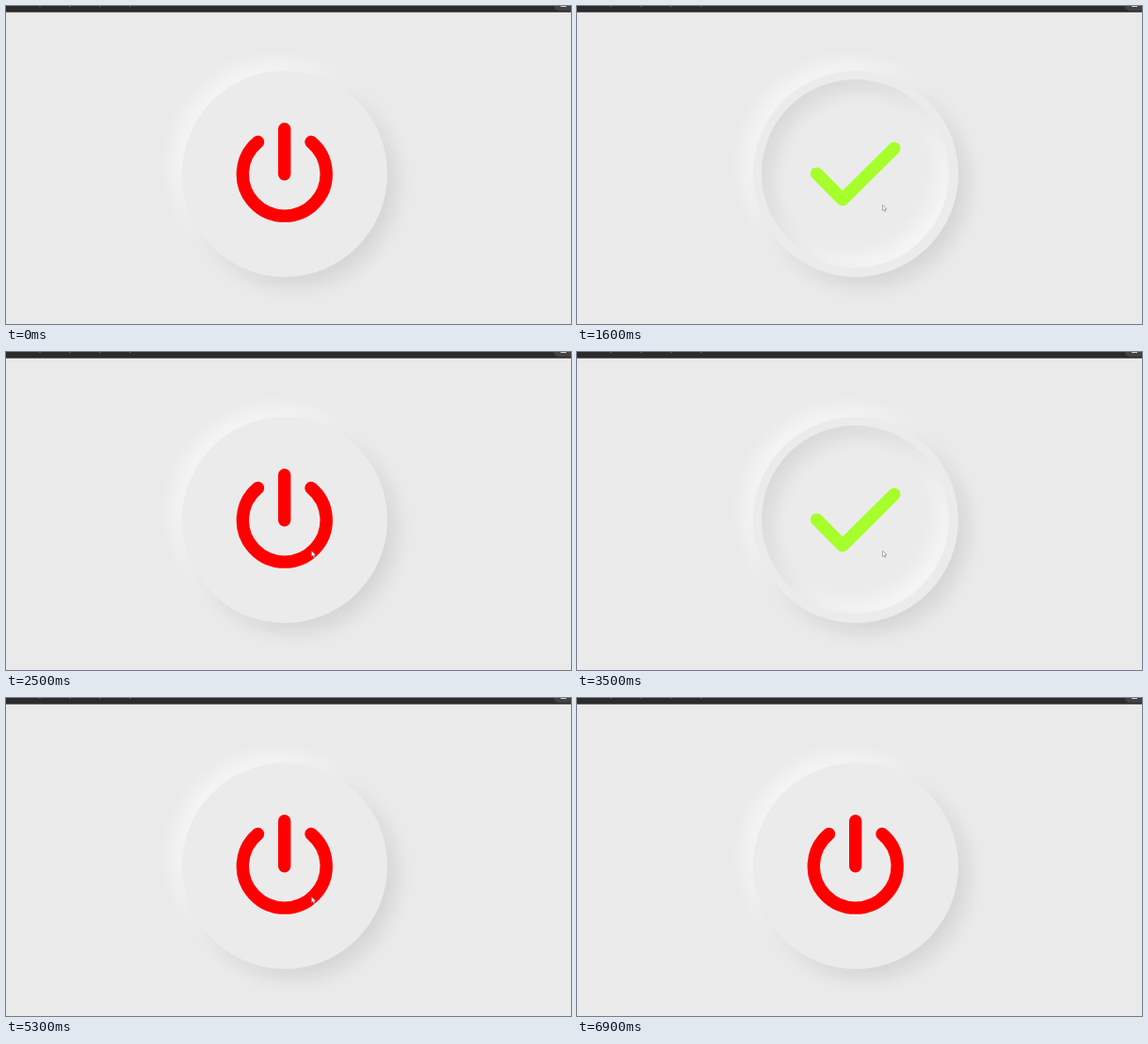
Animation of 600x338 px, one loop 8.2 s. Source, as an HTML page:

```html
<!DOCTYPE html>
<html lang="en">
<head>
<meta charset="utf-8">
<title>Power toggle</title>
<style>
  html, body { margin: 0; width: 100%; height: 100%; overflow: hidden; background: #ebeaeb; }
  #stage { position: relative; width: 600px; height: 338px; overflow: hidden; }
  #stage > * { position: absolute; }
  #bar { left: 0; top: 0; width: 600px; height: 6px; background: #2d2a2b; border-bottom: 1px solid #6a6768; }
  .disc { border-radius: 50%; background: #ecebec; }
  #button {
    left: 187px; top: 69px; width: 218px; height: 219px;
    box-shadow: 10px 10px 20px rgba(0, 0, 0, .09), -10px -10px 20px rgba(255, 255, 255, .55);
  }
  #well {
    left: 195.7px; top: 78px; width: 199px; height: 200px;
    box-shadow: inset 10px 10px 20px rgba(0, 0, 0, .08), inset -10px -10px 20px rgba(255, 255, 255, .55);
  }
  svg { left: 0; top: 0; }
  #power, #check { fill: none; stroke-width: 13.4; stroke-linecap: round; stroke-linejoin: round; }
  .on #power, .off #check, .off #well { display: none; }
</style>
</head>
<body>
<div id="stage" class="off">
  <div id="bar"></div>
  <div id="button" class="disc"></div>
  <div id="well" class="disc"></div>
  <svg width="600" height="338">
    <path d="M35 .5H135" stroke="#555" stroke-dasharray="2 30"/>
    <path d="M582 0H600V5H588Q582 5 582 0" fill="#454243"/>
    <path d="M589 .5h6" stroke="#ccc"/>
    <path id="power" stroke="#f00" d="M267.5 144.5A44.4 44.4 0 1 0 324 144.5M295.7 130.7V178.8"/>
    <path id="check" stroke="#a6ff2a" d="M254.5 178.1L282 205.7L336.9 151.3"/>
    <path id="cursor" d="M.5 .5V6.3L1.9 5.1L2.9 7.4L4 6.9L3 4.7H5Z" fill="#fff" stroke="#888" stroke-width=".7"/>
  </svg>
</div>
<script>
const LOOP = 8200, STEP = 100;
const toggles = [1500, 2400, 3500, 3900, 5500, 6500];

const linear = p => p;
const easeIn = p => p * p;
const easeOut = p => 1 - (1 - p) ** 2;
const start = { x: -50, y: 265 };
// each glide leaves from where the one before ended
const glides = [
  { from: 0, to: 200, x: 56, y: 249, ease: linear },
  { from: 400, to: 900, x: 303, y: 212, ease: easeOut },
  { from: 1000, to: 1100, x: 267, y: 212, ease: linear },
  { from: 1100, to: 1200, x: 324, y: 211, ease: linear },
  { from: 6300, to: 6900, x: -84, y: 248, ease: easeIn }
];
const stage = document.getElementById("stage");
const cursor = document.getElementById("cursor");

function pointer(t) {
  let { x, y } = start;
  for (const g of glides) {
    const p = g.ease(Math.min(1, Math.max(0, (t - g.from) / (g.to - g.from))));
    x += (g.x - x) * p;
    y += (g.y - y) * p;
  }
  return `${Math.round(x)} ${Math.round(y)}`;
}

function draw() {
  const t = Math.floor(performance.now() % LOOP / STEP) * STEP;
  const clicks = toggles.filter(at => at <= t).length;
  stage.className = clicks % 2 ? "on" : "off";
  cursor.setAttribute("transform", `translate(${pointer(t)})`);
  requestAnimationFrame(draw);
}
draw();
</script>
</body>
</html>
```
